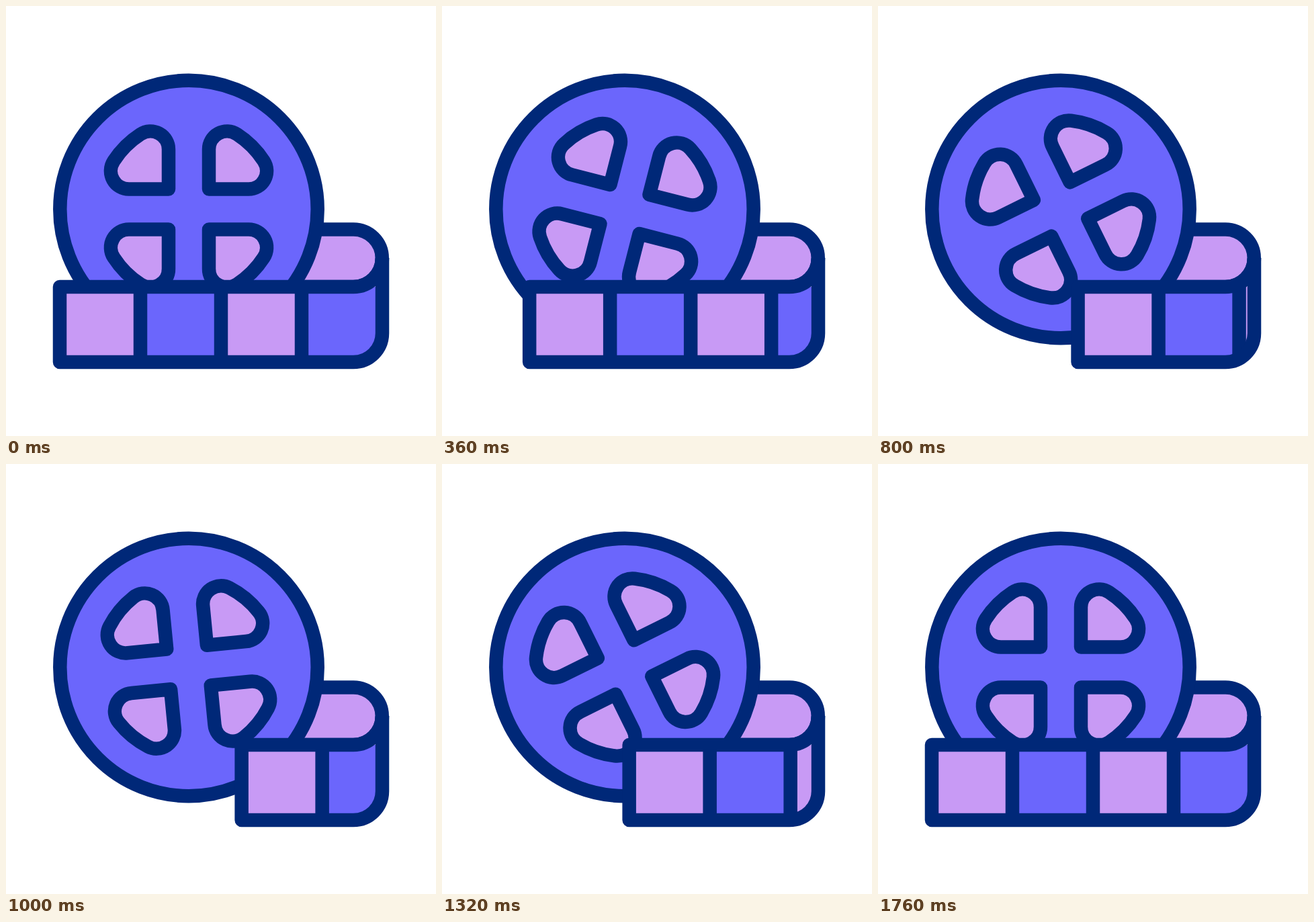
Animation of 640 by 640 pixels, one loop 2 s. Source, as an HTML page:

```html
<!DOCTYPE html>
<html lang="en">
<head>
<meta charset="utf-8">
<title>Film reel</title>
<style>
  html, body { margin: 0; height: 100%; overflow: hidden; background: #fff; }
  svg { display: block; width: 100%; height: 100%; }
  .line { stroke: #002878; stroke-width: 20.5; stroke-linejoin: round; }
  .pink { fill: #c89af5; }
  .blue { fill: #6b66fc; }
</style>
</head>
<body>
<svg viewBox="0 0 640 640">
  <defs>
    <path id="hole" class="pink line" d="M30-30V-88.5A27 27 0 0 1 72-111.5A133 133 0 0 1 111.5-72A27 27 0 0 1 88.5-30Z"/>
    <clipPath id="band">
      <path d="M0 418H517A43 43 0 0 0 560 375V487A43 43 0 0 1 517 530H0Z"/>
    </clipPath>
  </defs>

  <path class="pink line" d="M400 332.5H517A42.75 42.75 0 0 1 517 418H400Z"/>

  <g transform="translate(272 302.5)">
    <circle class="blue line" r="191.7"/>
    <g id="wheel">
      <use href="#hole"/>
      <use href="#hole" transform="rotate(90)"/>
      <use href="#hole" transform="rotate(180)"/>
      <use href="#hole" transform="rotate(270)"/>
    </g>
  </g>

  <g clip-path="url(#band)">
    <g id="cells">
      <path class="blue" d="M80 418H640V530H80Z"/>
      <path class="pink" d="M80 418h120v112H80ZM320 418h120v112H320Z"/>
      <path class="line" d="M200 418V530M320 418V530M440 418V530"/>
    </g>
  </g>
  <path class="line" fill="none" d="M517 418A43 43 0 0 0 560 375"/>
  <path id="edge" class="line" fill="none"/>
</svg>
<script>
const get = id => document.getElementById(id);
const wheel = get('wheel'), cells = get('cells'), edge = get('edge');

const STEP = 40, LOOP = 2000;
const START = 80, PEAK = 1120, END = 1760;
const TRAVEL = 281, TURN = 90;

// Ease with flat ends; a and b are the horizontal handle positions.
function ease(x, a, b) {
  x = Math.min(1, Math.max(0, x));
  let lo = 0, hi = 1, u = x;
  for (let i = 0; i < 30; i++) {
    u = (lo + hi) / 2;
    const v = 1 - u;
    if (3 * v * v * u * a + 3 * v * u * u * b + u * u * u < x) lo = u;
    else hi = u;
  }
  return u * u * (3 - 2 * u);
}

// Out and back, with a chosen softness on arrival at the peak.
function swing(t, arrive) {
  return t < PEAK
    ? ease((t - START) / (PEAK - START), 1 / 3, arrive)
    : 1 - ease((t - PEAK) / (END - PEAK), 0.23, 2 / 3);
}

function draw() {
  const t = Math.floor(performance.now() % LOOP / STEP) * STEP;
  const shift = TRAVEL * swing(t, 2 / 3);
  wheel.setAttribute('transform', `rotate(${TURN * swing(t, 0.777)})`);
  cells.setAttribute('transform', `translate(${shift} 0)`);
  edge.setAttribute('d', `M517 418H${80 + shift}V530H517A43 43 0 0 0 560 487V375`);
  requestAnimationFrame(draw);
}
draw();
</script>
</body>
</html>
```
